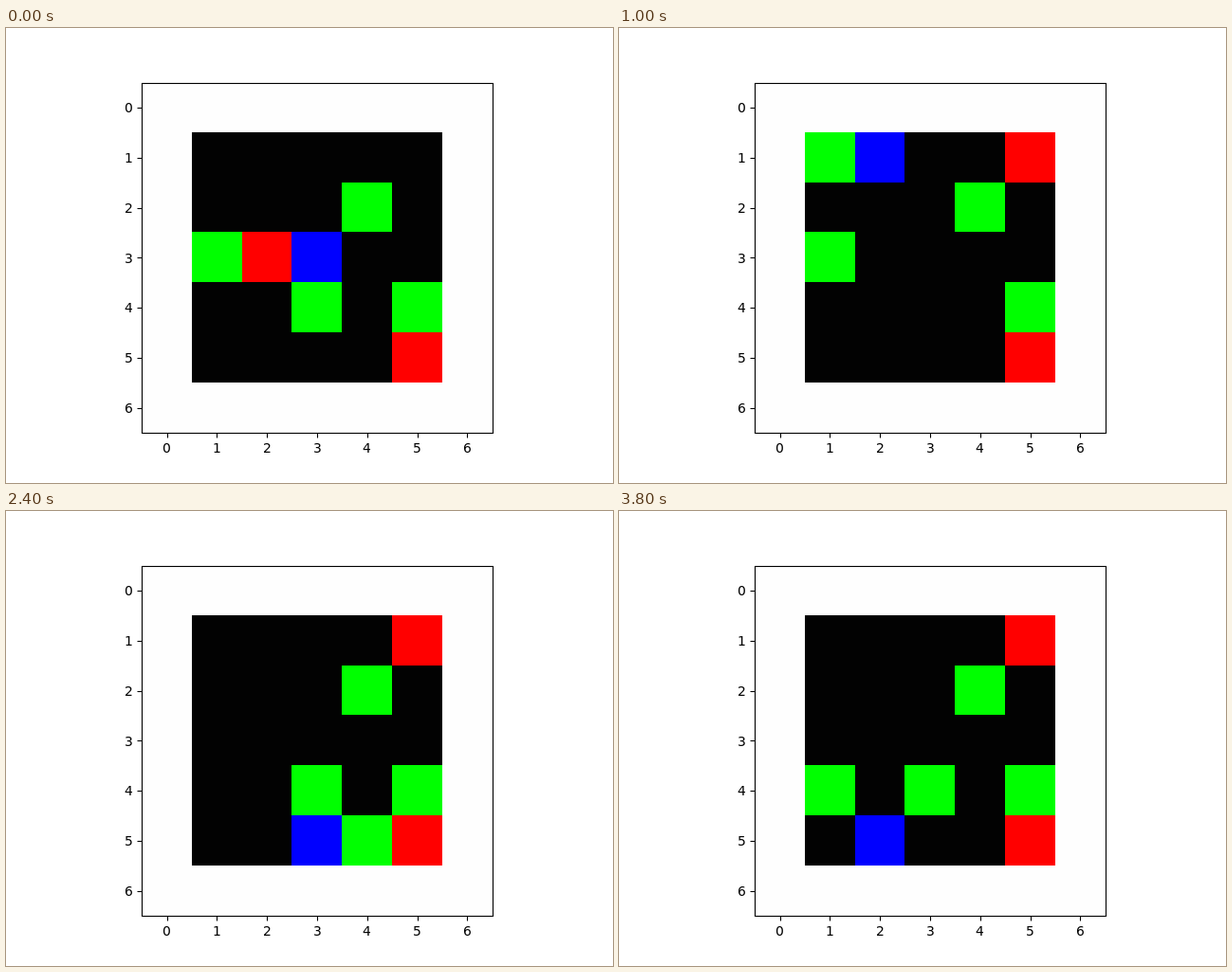
Animation of 640x480 px, one loop 4 s. Source, as an HTML page with a canvas:

```html
<!DOCTYPE html>
<html lang="en">
<head>
<meta charset="utf-8">
<title>Grid world</title>
<style>
  html, body { margin: 0; width: 100%; height: 100%; overflow: hidden; background: #fff; }
  canvas { display: block; }
</style>
</head>
<body>
<canvas id="stage" width="640" height="480"></canvas>
<script>
const ctx = document.getElementById("stage").getContext("2d");
const STEP = 200, CELL = 52.8, LEFT = 143.2, TOP = 57.6, SIZE = 7;
const GREEN = "#00ff00", RED = "#ff0000", BLUE = "#0000ff";

// Cells are written as "row column"; one move per step.
const START = "33";
const MOVES = "DULUURDDDDRRRLLRLRL".split("");
MOVES[5] = "L";
const DIRS = { U: [-1, 0], D: [1, 0], L: [0, -1], R: [0, 1] };
// Where an eaten item comes back, by step.
const RESPAWN = { 1: "11", 3: "15", 6: "41", 8: "43", 9: "51", 10: "54", 13: "41" };

function buildStates() {
  let agent = START;
  let items = { 24: GREEN, 31: GREEN, 43: GREEN, 45: GREEN, 32: RED, 55: RED };
  const states = [{ agent, items }];
  MOVES.forEach((move, i) => {
    const [dr, dc] = DIRS[move];
    agent = `${+agent[0] + dr}${+agent[1] + dc}`;
    items = { ...items };
    const eaten = items[agent];
    if (eaten) {
      delete items[agent];
      items[RESPAWN[i + 1]] = eaten;
    }
    states.push({ agent, items });
  });
  return states;
}

const states = buildStates();
const edge = k => Math.round(CELL * k);

function fillCells(row, col, span, color) {
  const x = edge(col), y = edge(row);
  ctx.fillStyle = color;
  ctx.fillRect(143 + x, 57 + y, edge(col + span) - x, edge(row + span) - y);
}

function line(x1, y1, x2, y2) {
  ctx.beginPath();
  ctx.moveTo(x1, y1);
  ctx.lineTo(x2, y2);
  ctx.stroke();
}

function drawAxes() {
  ctx.strokeStyle = ctx.fillStyle = "#000";
  ctx.lineWidth = 1.11;
  ctx.strokeRect(143.5, 58.5, 370, 369);
  ctx.font = '13.89px "DejaVu Sans", sans-serif';
  ctx.textBaseline = "alphabetic";
  for (let i = 0; i < SIZE; i++) {
    const x = LEFT + CELL * (i + 0.5), y = TOP + CELL * (i + 0.5);
    const tx = Math.round(x) + 0.5, ty = Math.round(y) + 0.5;
    line(tx, 427.5, tx, 432.5);
    line(138.5, ty, 143.5, ty);
    ctx.fillText(i, Math.round(x - 4.42), 448);
    ctx.fillText(i, 125, Math.round(y + 5.28));
  }
}

function draw({ agent, items }) {
  ctx.fillStyle = "#fff";
  ctx.fillRect(0, 0, 640, 480);
  fillCells(0, 0, SIZE, "#fefefe");
  fillCells(1, 1, 5, "#020202");
  for (const key in items) fillCells(+key[0], +key[1], 1, items[key]);
  fillCells(+agent[0], +agent[1], 1, BLUE);
  drawAxes();
}

function frame() {
  draw(states[Math.floor(performance.now() / STEP) % states.length]);
  requestAnimationFrame(frame);
}
frame();
</script>
</body>
</html>
```
